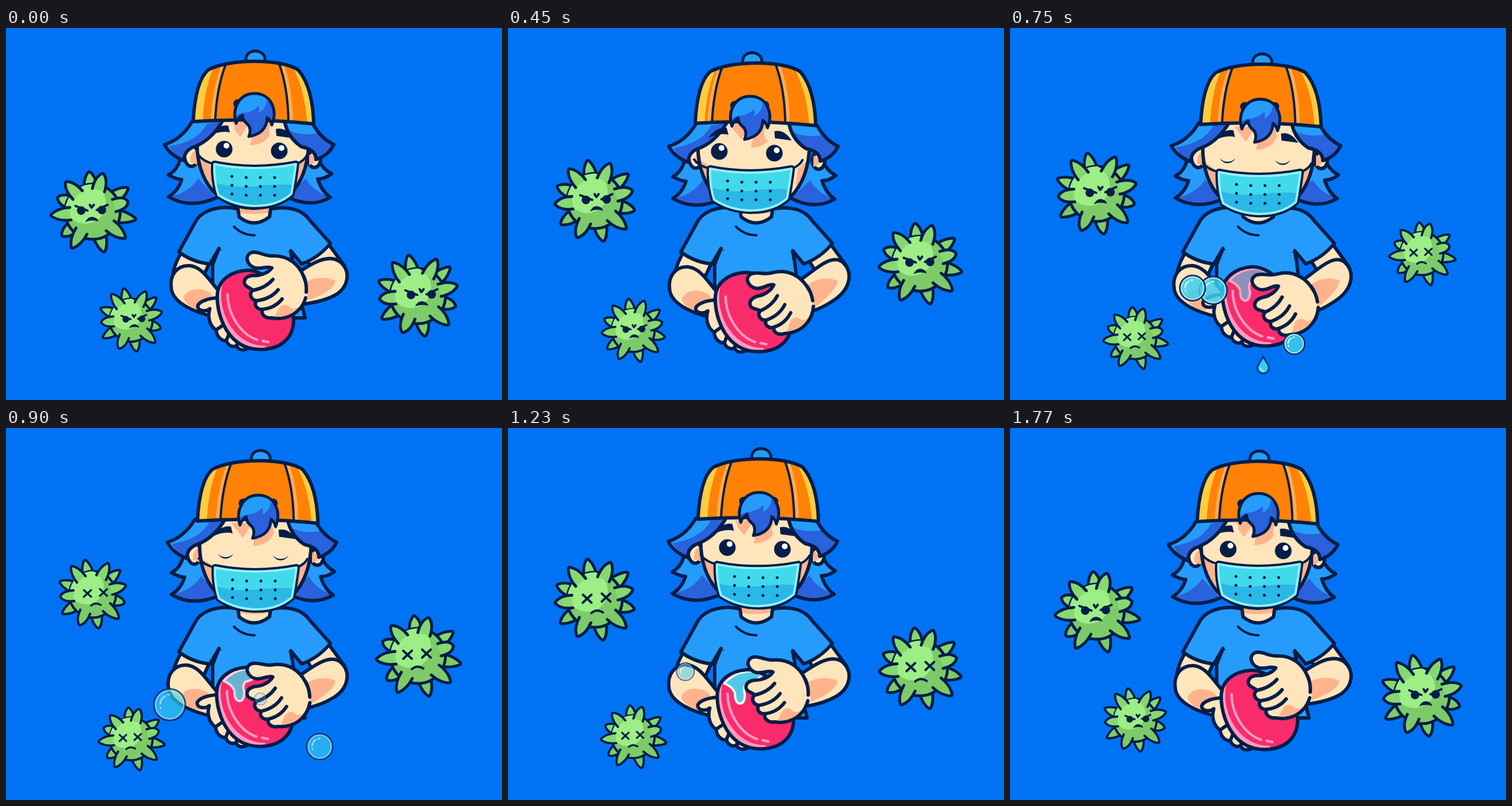
Animation of 864 by 648 pixels, one loop 1.8 s. Source, as an HTML page:

```html
<!DOCTYPE html>
<html lang="en">
<head>
<meta charset="utf-8">
<title>Wash your hands</title>
<style>
html, body { margin: 0; width: 100%; height: 100%; overflow: hidden; background: #0073f4; }
svg { display: block; width: 100vw; height: 100vh; }
.line { fill: none; stroke: #041e49; stroke-width: 6; stroke-linecap: round; stroke-linejoin: round; }
.skin { fill: #ffe5bc; }
.blush { fill: #ffb38c; }
.light { fill: #259cfb; }
.dark { fill: #2962dc; }
.navy { fill: #041e49; }
.thin { stroke-width: 4; }
</style>
</head>
<body>
<svg viewBox="0 0 864 648" stroke-linecap="round" stroke-linejoin="round">
<defs>
  <path id="capShape" d="M326 163C328 125 335 88 352 73C388 53 480 53 509 73C528 95 535 130 536 167Q430 156 326 163Z"/>
  <path id="lockShape" d="M401 166C393 140 406 114 433 114C461 114 474 142 463 169Q461 160 455 156Q454 184 423 189Q429 174 419 166Q412 160 412 152Q404 156 401 166Z"/>
  <path id="soapShape" d="M420 422C390 424 369 440 368 466C367 500 386 561 445 560C480 559 502 539 501 506C498 470 455 421 420 422Z"/>
  <path id="maskShape" d="M363 237Q432 251 505 237Q501 268 497 289C465 317 408 316 370 291Q362 266 363 237Z"/>
  <clipPath id="capClip"><use href="#capShape"/></clipPath>
  <clipPath id="lockClip"><use href="#lockShape"/></clipPath>
  <clipPath id="soapClip"><use href="#soapShape"/></clipPath>
  <clipPath id="maskClip"><use href="#maskShape"/></clipPath>
  <clipPath id="faceClip"><path d="M333 190C330 250 355 312 432 314C505 312 530 250 527 185L500 155H360Z"/></clipPath>
  <clipPath id="germClip"><circle r="48"/></clipPath>
</defs>
<rect width="864" height="648" fill="#0073f4"/>
<g id="germs"></g>

<g id="lowerHair">
  <path class="light" d="M335 235L303 228Q298 248 283 256Q295 263 306 264Q300 284 283 294Q320 316 366 296Z"/>
  <path class="light" d="M518 235L545 228Q552 246 567 254Q555 263 543 263Q550 285 565 295Q530 315 490 294Z"/>
  <path class="dark" d="M283 294Q318 288 335 262L366 296Q320 316 283 294ZM565 295Q535 285 522 262L490 294Q530 315 565 295Z"/>
  <path class="line" d="M303 230Q298 248 283 256Q295 263 306 264Q300 284 283 294Q320 316 366 296M545 230Q552 246 567 254Q555 263 543 263Q550 285 565 295Q530 315 490 294"/>
</g>

<g>
  <path class="skin" d="M404 300V330Q432 352 461 330V300Z"/>
  <path class="blush" d="M406 312H459L458 322Q430 326 406 322Z"/>
  <path class="line skin" style="fill:#ffe5bc" d="M305 392Q288 420 290 445L345 430L354 410Z"/>
  <path class="line" style="fill:#ffe5bc" d="M563 378L590 415L540 430L524 405Z"/>
  <path class="line" style="fill:#259cfb" d="M371 384L360 412V480L380 505H521L502 430L497 388Z"/>
  <path class="light" d="M404 315C375 308 345 316 332 334L301 390Q325 408 354 411L371 384L430 415L497 388L515 411Q545 400 565 375L530 336C518 318 495 309 461 315L459 329Q432 350 406 329Z"/>
  <path class="line" d="M371 384L355 411Q325 408 301 390L332 334C345 316 375 308 404 315L406 329Q432 350 459 329L461 315C495 309 518 318 530 336L565 375Q545 400 515 411L496 388L498 402"/>
  <path class="line thin" d="M397 346Q412 361 433 361"/>
</g>

<g id="leftArm">
  <path class="line" style="fill:#ffe5bc" d="M364 503C330 496 292 480 288 455C284 430 298 413 320 414C342 416 354 440 374 462"/>
  <path class="blush" d="M309 470C315 452 342 452 356 462L366 478L340 493Q315 486 309 470Z"/>
</g>
<g id="rightArm">
  <path id="forearm" class="line" style="fill:#ffe5bc"/>
  <path id="forearmShade" class="blush"/>
</g>
<g id="leftHand">
  <path class="line" style="fill:#ffe5bc" d="M372 470C352 470 336 477 334 484C333 493 348 495 355 489C350 505 356 520 366 526C367 540 378 546 384 544C386 554 396 557 402 553C404 562 414 562 422 558L430 500Z"/>
  <path class="line" d="M366 526L376 519M384 544L388 534M402 553L404 545"/>
</g>
<g id="soap">
  <use href="#soapShape" fill="#f92b6b"/>
  <g clip-path="url(#soapClip)" fill="none" stroke="#ff9bc0">
    <path stroke-width="9" d="M372 448C362 500 398 558 450 558"/>
    <path stroke-width="4.5" d="M386 464C386 500 410 534 437 543M447 545L457 547"/>
  </g>
  <path id="foam" fill="#45d5ee" stroke="#fff" stroke-width="4" d="M380 446Q400 424 430 425L447 431Q432 445 419 447Q412 452 416 465Q416 481 407 481Q398 479 399 463Q394 451 380 446Z"/>
  <use href="#soapShape" class="line"/>
</g>
<g id="rightHand">
  <path class="line" style="fill:#ffe5bc" d="M521 440C512 410 490 396 465 397C450 398 440 388 428 391C414 396 420 414 434 418C446 420 455 414 463 418C456 428 440 432 430 431C412 433 412 447 421 451C425 454 428 454 430 457C422 463 427 474 437 475C430 482 438 491 447 490C443 499 452 506 463 505C490 510 515 495 522 470"/>
  <path class="blush" d="M477 486Q488 477 496 488Q506 492 513 482Q497 506 468 502Z"/>
  <path class="line" d="M430 457Q452 453 465 438M437 475Q461 472 474 456M447 490Q468 488 481 472M519 433Q524 446 523 460"/>
</g>

<g id="ears">
  <ellipse class="line" style="fill:#ffe5bc" cx="323" cy="223" rx="12" ry="18"/>
  <ellipse class="line" style="fill:#ffe5bc" cx="537" cy="228" rx="11" ry="15"/>
  <path class="blush" d="M333 212Q320 215 321 234L333 238ZM528 220Q539 222 537 235L528 239Z"/>
</g>
<g id="face">
  <g clip-path="url(#faceClip)">
    <rect class="skin" x="320" y="150" width="220" height="170"/>
    <path class="blush" d="M330 222Q350 234 356 240L366 285L340 260ZM530 222Q515 234 507 240L502 280L525 255Z"/>
    <path class="blush" d="M388 164L408 190L425 164ZM425 204Q452 204 462 182L458 160L435 165Z"/>
  </g>
  <path class="line" d="M333 190C330 250 355 312 432 314C505 312 530 250 527 185"/>
</g>
<g id="eyes">
  <g id="leftEye"><circle class="navy" cx="380" cy="211" r="14.5"/><circle cx="384" cy="205" r="5" fill="#fff"/></g>
  <circle id="leftLid" class="skin" cx="380" r="18"/>
  <g id="rightEye"><circle class="navy" cx="476" cy="214" r="14.5"/><circle cx="480" cy="209" r="5" fill="#fff"/></g>
  <circle id="rightLid" class="skin" cx="476" r="18"/>
  <path id="wink" class="line thin" d="M461 215Q475 210 482 219Q487 224 491 226"/>
</g>
<g id="mask">
  <path class="line thin" d="M335 221Q344 233 363 237M505 237Q519 232 524 222"/>
  <use href="#maskShape" fill="none" stroke="#041e49" stroke-width="12"/>
  <use href="#maskShape" fill="#41d9ec"/>
  <path clip-path="url(#maskClip)" fill="#2ab8e6" d="M360 268Q390 279 430 276Q470 270 510 274V320H360Z"/>
  <use href="#maskShape" fill="none" stroke="#92f1f5" stroke-width="4"/>
  <g id="dots" class="navy"></g>
</g>
<g id="upperHair">
  <path class="light" d="M324 163Q306 194 276 203Q286 222 310 231Q310 212 330 206Q357 195 376 162Z"/>
  <path class="dark" d="M284 206Q334 198 350 167L376 162Q357 195 330 206Q310 212 310 231Q294 224 284 206Z"/>
  <path class="dark" d="M534 166Q548 192 571 203Q562 222 540 229Q540 212 515 207Q490 192 484 164Z"/>
  <path class="light" d="M484 164L534 166L541 184Q512 188 492 178Z"/>
  <path class="line" d="M324 163Q306 194 276 203Q286 222 310 231Q310 212 330 206Q357 195 376 164M534 166Q548 192 571 203Q562 222 540 229Q540 212 515 207Q492 192 486 166"/>
</g>
<path id="brows" class="navy" d="M354 188Q370 167 387 170L390 182Q374 178 354 188ZM470 176Q487 172 500 192L471 188Z"/>
<g id="button"><path class="line" style="fill:#259cfb;stroke-width:5" d="M418 60V52C421 36 447 36 451 52V60Z"/></g>
<g id="cap">
  <g clip-path="url(#capClip)">
    <rect x="310" y="40" width="240" height="135" fill="#ff8206"/>
    <path fill="#ffcc40" d="M320 170L330 90L365 62Q345 100 342 170ZM545 170L530 90L495 62Q520 100 525 170Z"/>
    <g id="seams">
      <path fill="#ffad4f" d="M384 58Q364 105 364 170H356Q358 105 378 58ZM475 58Q492 105 492 170H500Q500 105 482 58Z"/>
      <path class="line thin" d="M384 60Q366 105 364 170M475 60Q492 105 492 170"/>
      <circle class="navy" cx="404" cy="132" r="8"/><circle class="navy" cx="456" cy="132" r="8"/>
    </g>
  </g>
  <use href="#capShape" class="line"/>
</g>
<g id="lock">
  <use href="#lockShape" class="dark"/>
  <path clip-path="url(#lockClip)" class="light" d="M390 164Q402 150 411 148Q428 148 440 136Q442 142 440 148Q454 140 454 126Q464 132 470 146V105H390Z"/>
  <use href="#lockShape" class="line" style="stroke-width:5"/>
</g>
<g id="drop"><path d="M0 -15C3 -7 10 -1 10 5A10 10 0 0 1 -10 5C-10 -1 -3 -7 0 -15Z" fill="#2fd0ef" stroke="#083c86" stroke-width="3"/><path d="M-5 5Q-4 10 1 10" fill="none" stroke="#b8f3fb" stroke-width="2"/></g>
<g id="bubbles"></g>
</svg>
<script>
const LOOP = 1800, STEP = 30;
const KEYS = [0, 270, 600, 750, 1050, 1470, 1770, 1800];
const $ = id => document.getElementById(id);
const mix = (a, b, k) => a + (b - a) * k;
const clamp = k => Math.max(0, Math.min(1, k));
const move = (id, x, y, extra = '') => $(id).setAttribute('transform', `translate(${x} ${y}) ${extra}`);
const show = (node, on) => node.setAttribute('display', on ? 'inline' : 'none');

// Smooth periodic curve through the key times, without overshoot.
function track(...values) {
  const y = [...values, values[0], values[0]], n = KEYS.length - 1;
  const slope = i => (y[i + 1] - y[i]) / (KEYS[i + 1] - KEYS[i]);
  const tangent = i => {
    const a = slope((i + n - 1) % n), b = slope(i % n);
    return a * b > 0 ? 2 * a * b / (a + b) : 0;
  };
  return t => {
    let i = 0;
    while (t >= KEYS[i + 1]) i++;
    const h = KEYS[i + 1] - KEYS[i], u = (t - KEYS[i]) / h, v = 1 - u;
    return y[i] * (1 + 2 * u) * v * v + y[i + 1] * u * u * (3 - 2 * u)
      + h * u * v * (tangent(i) * v - tangent(i + 1) * u);
  };
}

// Straight segments through [time, ...values]; null outside the range.
function path(points, t) {
  const i = points.findIndex((p, n) => n && t < p[0]);
  if (i < 1 || t < points[0][0]) return null;
  const a = points[i - 1], b = points[i], k = (t - a[0]) / (b[0] - a[0]);
  return a.map((v, n) => mix(v, b[n], k)).slice(1);
}

const seamX = track(0, -9, -9, 5, 11, 0), capY = track(0, 3, 3, 5, -7, 0);
const backX = track(0, 4, 4, 5, 5, 0), backY = track(0, 3, 3, 2, -9, 0);
const faceX = track(0, -2, -2, 3, 5, 0), faceY = track(0, 4, 4, 8, -5, 0);
const soapX = track(0, -14, 0, 2, -4, -2), soapY = track(0, 12, -4, -6, -4, 2);
const parts = {
  lowerHair: [backX, backY], upperHair: [backX, backY], ears: [backX, backY],
  face: [faceX, faceY], brows: [track(0, -6, -6, 2, 6, 0), faceY],
  eyes: [track(0, -12, -12, -1, 4, -1), track(0, 4, 4, 10, -6, 2)],
  mask: [track(0, -11, -11, 1, 1, 1), track(0, 8, 8, 14, -2, 4)],
  cap: [track(0, 0, 0, 6, 8, 0), capY], button: [seamX, capY],
  lock: [track(0, -11, -11, 3, 8, -1), track(0, 5, 5, 10, -4, 2)],
  leftArm: [track(0, -12, -2, -2, -8, -6), track(0, 5, 0, 0, -2, 0)],
  soap: [soapX, soapY], leftHand: [soapX, soapY],
};
const handX = track(0, 5, 9, 12, -1, 1), handY = track(0, 27, 25, 28, 0, 17);
const handTurn = track(0, -12, -13, -13, 0, -5);

for (let i = 0; i < 12; i++) {
  const col = i % 4, row = i >> 2, bend = col ? 2 : 0;
  $('dots').innerHTML += `<circle cx="${393.5 + col * 24.8}" cy="${258.5 + row * 15.4 + bend}" r="2.5"/>`;
}

// Spikes: angle and length in one lean, then in the other.
const backSpikes = [[-95, 70, -103, 73], [-34, 74, -42, 75], [10, 76, 15, 68], [74, 73, 80, 71], [142, 68, 148, 74], [202, 66, 201, 73]];
const frontSpikes = [[-132, 70, -127, 73], [-75, 69, -63, 72], [-16, 64, -15, 71], [39, 73, 43, 73], [120, 73, 113, 69], [175, 73, 176, 67]];
const spikes = [...backSpikes, ...frontSpikes];

const germs = [
  { x: 151, y: track(320, 312, 293, 289, 292, 312), size: 1, lean: y => (320 - y) / 31, dies: 870, wakes: 1590 },
  { x: 717.5, y: track(467, 436, 396, 393, 405, 441), size: 1, lean: y => (y - 393) / 74, dies: 740, wakes: 1650 },
  { x: 218, y: track(509, 517, 535, 540, 542, 526), size: .78, lean: y => (542 - y) / 33, dies: 675, wakes: 1620 },
];
const spikePath = ([angle]) => `<path class="line" style="stroke-width:5;fill:${angle > 0 && angle < 150 ? '#7dcb68' : '#86d870'}"/>`;
for (const germ of germs) {
  const g = germ.node = document.createElementNS('http://www.w3.org/2000/svg', 'g');
  g.innerHTML = `${backSpikes.map(spikePath).join('')}
    <circle class="line" r="48" style="stroke-width:5;fill:#7dcb68"/>
    <circle cx="-13" cy="-15" r="36" fill="#9cee85" clip-path="url(#germClip)"/>
    ${frontSpikes.map(spikePath).join('')}
    <g class="look"><g class="angry">
      <circle class="navy" cx="-18" cy="-1" r="7.5"/><circle class="navy" cx="18" cy="-2" r="7.5"/>
      <path class="line thin" d="M-28 -9L-7 -1M28 -11L9 -2M-3 -11L0 -6L4 -11"/>
      <path class="navy" d="M-11 19Q-6 9 2 10Q10 11 12 18Q0 14 -11 19Z"/>
    </g><g class="beaten line thin">
      <path d="M-24 -8L-9 6M-9 -8L-24 6M9 -10L24 4M24 -10L9 4M-9 24Q0 16 11 23"/>
    </g></g>`;
  germ.spikes = [...g.querySelectorAll('path')].filter((p, i) => p.parentNode === g);
  germ.look = g.querySelector('.look');
  germ.angry = g.querySelector('.angry');
  germ.beaten = g.querySelector('.beaten');
  $('germs').append(g);
}

function drawGerm(germ, t) {
  const y = germ.y(t), lean = germ.lean(y);
  const dip = time => .25 * clamp(1 - Math.abs(t - time) / 80);
  const size = germ.size * (1 - dip(germ.dies) - dip(germ.wakes));
  const beaten = t >= germ.dies && t < germ.wakes;
  germ.node.setAttribute('transform', `translate(${germ.x} ${y}) scale(${size})`);
  spikes.forEach(([a1, l1, a2, l2], i) => {
    const tip = mix(l1, l2, lean), base = i < 6 ? 36 : 39;
    germ.spikes[i].setAttribute('d', `M${base} -11Q59 -12 ${tip - 1} -2Q${tip + 1} 0 ${tip - 1} 2Q59 12 ${base} 11`);
    germ.spikes[i].setAttribute('transform', `rotate(${mix(a1, a2, lean)})`);
  });
  germ.look.setAttribute('transform', `translate(${mix(-2, 6, lean)} -1)`);
  show(germ.angry, !beaten);
  show(germ.beaten, beaten);
}

// Each stop: time, x, y, radius, opacity.
const bubbles = [
  [[540, 385, 420, 8, 0], [600, 371, 413, 23, .75], [750, 354, 457, 23, 1], [900, 342, 482, 26, 0]],
  [[540, 360, 440, 4, 0], [600, 342, 431, 13, .7], [750, 318, 453, 21, 1], [1050, 252, 511, 32, .55], [1140, 236, 526, 34, 0]],
  [[540, 446, 522, 3, 0], [600, 448, 530, 9, .5], [750, 495, 550, 17, 1], [1050, 598, 560, 26, .5], [1140, 625, 562, 28, 0]],
  [[990, 352, 452, 4, 0], [1050, 338, 441, 11, .7], [1470, 270, 402, 18, .5], [1590, 255, 392, 20, 0]],
  [[870, 440, 470, 6, 0], [960, 450, 476, 15, .9], [1050, 462, 482, 23, .6], [1140, 470, 486, 26, 0]],
];
$('bubbles').innerHTML = bubbles.map(() => `<g>
  <circle r="1" fill="#3ccfee" fill-opacity=".85" stroke="#0a2c62" stroke-width="5"/>
  <circle r=".93" fill="none" stroke="#a5e6f4" stroke-width="2.5"/>
  <path d="M-.62 -.05Q-.58 -.42 -.3 -.56M-.12 -.64L0 -.66M-.6 .18L-.57 .24" fill="none" stroke="#d4f8fc" stroke-width="2.5"/>
</g>`).join('');
$('bubbles').querySelectorAll('circle, path').forEach(n => n.setAttribute('vector-effect', 'non-scaling-stroke'));

function place(node, state) {
  show(node, state);
  if (!state) return;
  const [x, y, size, opacity] = state;
  node.setAttribute('transform', `translate(${x} ${y}) scale(${size})`);
  node.setAttribute('opacity', opacity);
}

function drawArm(shift) {
  const top = 424 + shift * .55, low = 481 + shift * .5, wrist = 518 + shift * .3;
  $('forearm').setAttribute('d', `M${512 - shift * .1} ${top}C530 ${top - 12} 562 391 583 408C602 425 596 453 572 ${466 + shift * .2}C557 ${474 + shift * .3} 540 ${low - 3} ${wrist} ${low}`);
  $('forearmShade').setAttribute('d', `M524 ${441 + shift * .2}Q548 430 574 440Q572 458 ${wrist + 8} ${low - 7}Z`);
}

function draw(t) {
  for (const id in parts) move(id, parts[id][0](t), parts[id][1](t));
  move('seams', seamX(t) - parts.cap[0](t), 0);
  move('rightHand', handX(t), handY(t), `rotate(${handTurn(t)} 475 452)`);
  drawArm(handY(t));

  const shut = clamp((t - 540) / 110) * clamp((1010 - t) / 90);
  $('leftLid').setAttribute('cy', 211 + mix(-35, -6, shut));
  $('rightLid').setAttribute('cy', 214 + mix(-35, -6, shut));
  const winking = t >= 1380 && t < 1590;
  show($('rightEye'), !winking);
  show($('wink'), winking);

  const foam = path([[540, 0], [600, .25], [750, .6], [1050, 1], [1200, 1], [1470, .55], [1620, 0]], t);
  $('foam').setAttribute('opacity', foam ? foam[0] : 0);
  place($('drop'), path([[660, 441, 556, .4, 0], [720, 441, 573, .9, 1], [750, 441, 587, 1, 1], [810, 441, 606, 1, .8], [870, 441, 612, .8, 0]], t));
  bubbles.forEach((stops, i) => place($('bubbles').children[i], path(stops, t)));
  germs.forEach(germ => drawGerm(germ, t));
}

function tick() {
  const t = performance.now() % LOOP;
  draw(Math.floor(t / STEP) * STEP);
  requestAnimationFrame(tick);
}
tick();
</script>
</body>
</html>
```
